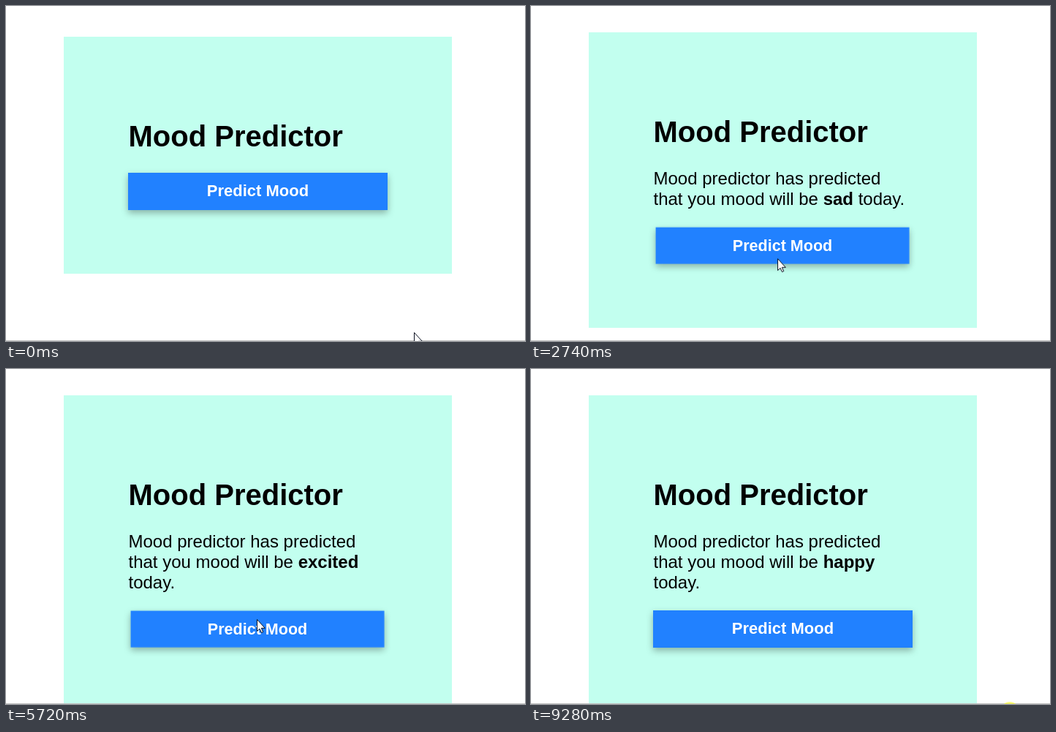
An HTML page that plays this animation: 710x458 px, repeating every 9.36 s.

```html
<!DOCTYPE html>
<html lang="en">
<head>
<meta charset="utf-8">
<title>Mood Predictor</title>
<style>
  html, body { margin: 0; width: 100%; height: 100%; overflow: hidden; background: #fff; }
  svg { display: block; font-family: "Liberation Sans", Arial, sans-serif; }
  text { white-space: pre; }
  .bold { font-weight: bold; }
  .body { font-size: 24px; }
  #face { transform-origin: 344px 25.5px; }
  #plate { fill: #2181ff; filter: drop-shadow(0 4px 5px rgba(0, 0, 0, .3)); }
  #label { font-size: 22px; fill: #fff; text-anchor: middle; }
</style>
</head>
<body>
<svg width="710" height="458" viewBox="0 0 710 458">
  <g id="page">
    <rect id="card" x="79" y="42" width="531" height="324" fill="#c2ffef"/>
    <text class="bold" x="167.5" y="192" font-size="40">Mood Predictor</text>
    <g id="message" class="body">
      <text x="167.5" y="250">Mood predictor has predicted</text>
      <text id="sad" x="167.5" y="278">that you mood will be <tspan class="bold">sad</tspan> today.</text>
      <text id="excited" x="167.5" y="278">that you mood will be <tspan class="bold">excited</tspan></text>
      <text id="happy" x="167.5" y="278">that you mood will be <tspan class="bold">happy</tspan></text>
      <text id="today" x="167.5" y="306">today.</text>
    </g>
    <g id="button">
      <g id="face">
        <rect id="plate" x="167" width="355" height="51"/>
        <text id="label" class="bold" x="344.5" y="32">Predict Mood</text>
      </g>
    </g>
  </g>
  <rect y="457" width="710" height="1" fill="#c0c0c0"/>
  <circle id="glow" cx="655" cy="468" r="13" fill="#ff0"/>
  <g id="cursor">
    <path id="arrow" d="M.5.5V16.5L4 13.2 6.5 18.5 8.7 17.5 6.3 12.3H11.3Z" fill="#fff" stroke="#0a1020"/>
    <path id="beam" d="M-3 -7.5H0M1 -7.5H4M.5 -7V7M-3 7.5H0M1 7.5H4" fill="none" stroke="#223"/>
  </g>
</svg>
<script>
const LOOP = 9360;
const HOVER_FADE = 400;
const CLICKS = { sad: 890, excited: 5650, happy: 7920 };
const HOVERS = [[480, CLICKS.sad], [2010, 3410], [5230, 6230], [7375, 8190]];
const start = document.timeline.currentTime ?? 0;

// steps: [time, value, easing towards the next step]
function track(id, property, steps, easing = 'step-end') {
  const frames = steps.map(([time, value, ease = easing]) =>
    ({ offset: time / LOOP, [property]: value, easing: ease }));
  frames.push({ offset: 1, [property]: steps.at(-1)[1] });
  const motion = document.getElementById(id)
    .animate(frames, { duration: LOOP, iterations: Infinity });
  motion.startTime = start;
}

const shift = (x, y) => `translate(${x}px, ${y}px)`;

function showBetween(id, from, to = LOOP, opacity = 1) {
  track(id, 'opacity', [[0, 0], [from, opacity], [to, 0]]);
}

// Holds one value from each hover until its fade back has ended.
function whileScaled(id, property, rest, scaled) {
  track(id, property, [[0, rest], ...HOVERS.flatMap(([enter, leave]) =>
    [[enter, scaled], [leave + HOVER_FADE, rest]])]);
}

track('page', 'transform', [[0, shift(0, 0)], [2400, shift(0, -6)]]);

// Every line of the message pushes the card and the button down.
const growth = [[0, 0], [CLICKS.sad, 80], [CLICKS.excited, 108]];
track('card', 'height', growth.map(([t, extra]) => [t, `${324 + extra}px`]));
track('button', 'transform', growth.map(([t, extra]) => [t, shift(0, 228 + extra)]));

showBetween('message', CLICKS.sad);
showBetween('sad', CLICKS.sad, CLICKS.excited);
showBetween('excited', CLICKS.excited, CLICKS.happy);
showBetween('happy', CLICKS.happy);
showBetween('today', CLICKS.excited);
showBetween('glow', 9280, LOOP, 0.5);

const idle = 'scale(1)', hovered = 'scale(.98)';
track('face', 'transform', [[0, idle], ...HOVERS.flatMap(([enter, leave]) => [
  [enter, idle, 'ease'],
  [enter + HOVER_FADE, hovered],
  [leave, hovered, 'ease'],
  [leave + HOVER_FADE, idle]
])]);
// At rest the button snaps to whole pixels.
whileScaled('plate', 'width', '355px', '354px');
whileScaled('label', 'transform', shift(0, 0), shift(-0.5, 1));

const stops = [
  [0, 558, 446], [850, 344, 262], [1130, 344, 263], [2740, 337, 345],
  [3410, 343, 354], [3650, 345, 383], [4970, 329, 409], [5500, 343, 342],
  [6070, 343, 342], [6550, 403, 447], [7700, 326, 355], [8110, 326, 355],
  [8550, 580, 470]
];
track('cursor', 'transform', stops.map(([t, x, y]) => [t, shift(x, y)]), 'linear');
const overText = [CLICKS.sad, 1540];
track('arrow', 'opacity', [[0, 1], [overText[0], 0], [overText[1], 1]]);
showBetween('beam', ...overText);
</script>
</body>
</html>
```
